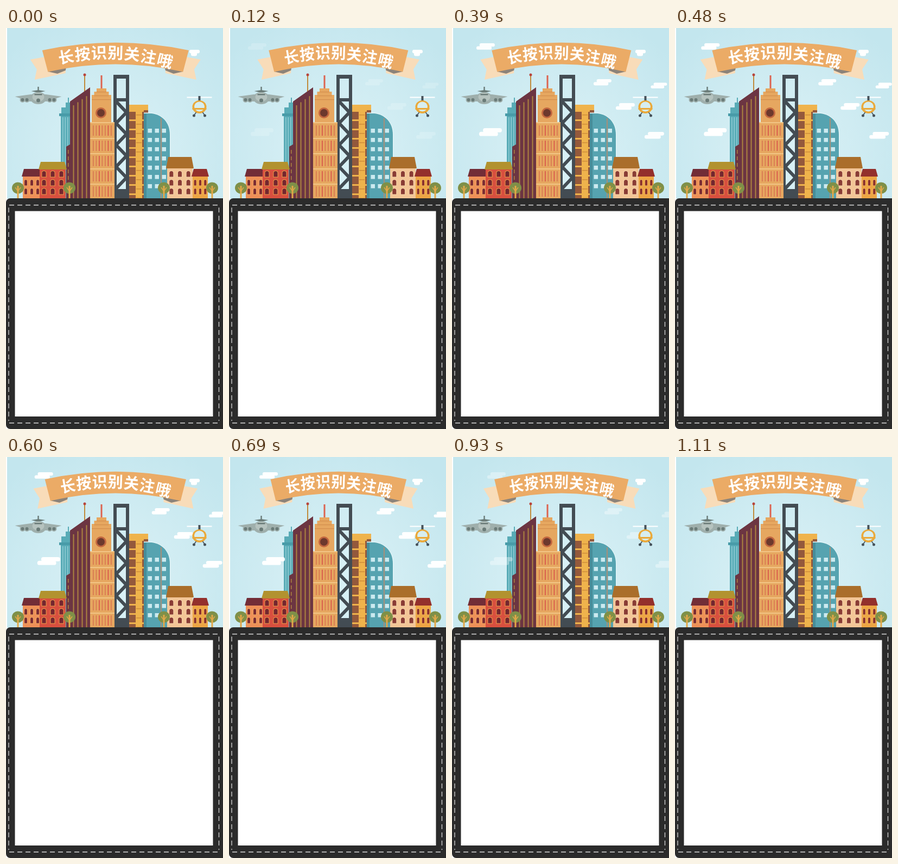
Animation of 400x737 px, one loop 1140 ms. Source, as an HTML page with a canvas:

```html
<!DOCTYPE html>
<html lang="zh">
<head>
<meta charset="utf-8">
<style>
  html, body { margin: 0; width: 100%; height: 100%; overflow: hidden; background: #fff; }
  canvas { display: block; }
</style>
</head>
<body>
<canvas id="stage" width="400" height="737"></canvas>
<script>
const LOOP = 1140, STEP = 30, PEAK = 510;
const GROUND = 313;
const main = document.getElementById('stage').getContext('2d');
let c = main;

function rect(color, x, y, w, h) {
  c.fillStyle = color;
  c.fillRect(x, y, w, h);
}

// rectangle from y down to the ground
function column(color, x, y, w) {
  rect(color, x, y, w, GROUND - y);
}

function poly(color, ...p) {
  c.fillStyle = color;
  c.beginPath();
  for (let i = 0; i < p.length; i += 2) c.lineTo(p[i], p[i + 1]);
  c.closePath();
  c.fill();
}

function line(color, width, ...p) {
  c.strokeStyle = color;
  c.lineWidth = width;
  c.beginPath();
  for (let i = 0; i < p.length; i += 2) c.lineTo(p[i], p[i + 1]);
  c.stroke();
}

function oval(color, x, y, rx, ry = rx) {
  c.fillStyle = color;
  c.beginPath();
  c.ellipse(x, y, rx, ry, 0, 0, Math.PI * 2);
  c.fill();
}

function round(color, x, y, w, h, r) {
  c.fillStyle = color;
  c.beginPath();
  c.roundRect(x, y, w, h, r);
  c.fill();
}

function mirror(paint) {
  for (const side of [-1, 1]) {
    c.save();
    c.scale(side, 1);
    paint();
    c.restore();
  }
}

function repeat(n, paint) {
  for (let i = 0; i < n; i++) paint(i);
}

function paintSky() {
  const glow = c.createRadialGradient(200, 230, 40, 200, 230, 270);
  glow.addColorStop(0, '#d8f0f5');
  glow.addColorStop(1, '#c3e6ee');
  rect(glow, 2, 0, 398, GROUND + 1);
}

function sky() {
  rect('#fff', 0, 0, 400, 737);
  paintSky();
}

function house(x, y, w, roofH, cols, roof, wall, pane, trim) {
  column(wall, x, y + roofH, w);
  poly(roof, x + 2, y, x + w - 2, y, x + w + 2, y + roofH, x - 2, y + roofH);
  const gap = w / cols, size = gap * 0.45, rows = Math.floor((GROUND - y - roofH) / 17);
  repeat(cols, i => repeat(rows, j => {
    const left = x + gap * (i + 0.5) - size / 2, top = 295 - j * 16;
    round(trim, left - 1, top - 1, size + 2, 12.5, [size, size, 0, 0]);
    round(pane, left, top, size, 10.5, [size / 2, size / 2, 0, 0]);
  }));
}

function tree(x) {
  oval('#7f9048', x, 294, 11, 10.5);
  column('#e3a748', x - 1.5, 290, 3);
  line('#e3a748', 1.5, x - 5, 293, x, 300, x + 5, 293);
}

function tealTower() {
  const wall = '#58abb6';
  rect(wall, 114, 128, 2, 12);
  rect(wall, 110, 137, 9, 12);
  rect(wall, 102, 146, 18, 12);
  rect('#489ba8', 98, 157, 22, 5);
  column(wall, 101, 162, 19);
  repeat(4, i => column('#8ecbd3', 104 + i * 4.5, 164, 1.6));
}

function plumTower() {
  rect('#c08a3a', 144, 88, 2, 30);
  oval('#b8443c', 145, 86, 2.5);
  poly('#6c3542', 118, 135, 155, 109, 155, GROUND, 111, GROUND, 111, 218, 118, 214);
  repeat(4, i => column('#ab8440', 123.5 + i * 8, 142 - i * 5.6, 2));
  repeat(7, i => rect('#ab8440', 114, 224 + i * 12, 1.5, 7));
}

function clockTower() {
  const wall = '#e6a760', pale = '#f2c585', shade = '#d38e4d';
  rect('#dc6450', 174.5, 87, 3, 26);
  repeat(3, i => rect(wall, 167 - i * 4.5, 111 + i * 6, 18 + i * 9, 8));
  rect(wall, 158, 128, 36, 48);
  column(wall, 155, 174, 45);
  repeat(3, i => rect(shade, 167 - i * 4.5, 117 + i * 7, 18 + i * 9, 1.2));
  oval('#c2673f', 175, 156, 10);
  oval('#6c382d', 175, 156, 7);
  rect(pale, 155, 173, 45, 2);
  repeat(5, j => {
    const y = 179 + j * 28;
    repeat(7, i => rect(i % 3 === 2 ? '#d9584b' : '#d97a52', 160 + i * 5.5, y, 1.8, 19));
    rect(pale, 155, y + 23, 45, 2);
  });
}

function trussTower() {
  const steel = '#434c53';
  column(steel, 198, 86, 29);
  c.save();
  c.beginPath();
  c.rect(204, 93, 17, 36);
  c.rect(204, 135, 17, 161);
  c.clip();
  paintSky();
  c.beginPath();
  c.rect(204, 135, 17, 161);
  c.clip();
  const zig = [];
  repeat(9, i => zig.push(i % 2 ? 222 : 203, 135 + i * 20));
  line(steel, 6, ...zig);
  c.restore();
}

function amberBlock() {
  const amber = '#efb34c';
  column('#94593c', 227, 141, 35);
  rect(amber, 227, 141, 35, 10);
  column(amber, 239, 150, 12);
  repeat(10, i => {
    rect(amber, 227, 151 + i * 17, 27, 3);
    rect('#cf8c3a', 240, 159 + i * 17, 10, 1.5);
  });
}

function curvedBlock() {
  const shape = (color, d) => {
    c.fillStyle = color;
    c.beginPath();
    c.moveTo(254, GROUND);
    c.lineTo(254, 157 - d);
    c.lineTo(268, 157 - d);
    c.bezierCurveTo(286, 159 - d, 302 + d, 172, 302 + d, 196);
    c.lineTo(302 + d, GROUND);
    c.fill();
  };
  shape('#e2f4f7', 1.5);
  shape('#56a3b0', 0);
  column('#468d9a', 254, 158, 5);
  column('#b08d72', 285, 166, 1.8);
  repeat(3, i => repeat(7, j => rect('#cbeaf0', 261.5 + i * 13, 185 + j * 17, 7.5, 7.5)));
}

function city() {
  tealTower();
  plumTower();
  trussTower();
  clockTower();
  amberBlock();
  curvedBlock();
  house(31, 259, 33, 14, 3, '#722d37', '#ee9058', '#7b2c33', '#f0ab62');
  house(62, 246, 48, 14, 3, '#b2922f', '#d8503f', '#74262f', '#eda04c');
  house(297, 237, 47, 21, 3, '#aa6e2b', '#f3c697', '#893c35', '#f8d8ae');
  house(344, 259, 28, 14, 3, '#93302c', '#eda544', '#8b302d', '#f3b95c');
  [22, 117, 291, 380].forEach(tree);
}

function plane() {
  const body = '#9fafac', dark = '#6a7b78';
  c.save();
  c.translate(59.5, 0);
  rect(dark, -1.2, 108, 2.4, 13);
  mirror(() => {
    poly(dark, 0, 114, 13, 116, 0, 119);
    poly(body, 0, 122, 14, 122, 43, 126, 16, 135, 0, 135);
    repeat(2, i => {
      oval(body, 21 + i * 8, 132, 5);
      oval(dark, 21 + i * 8, 132, 3);
    });
  });
  oval(body, 0, 129, 15, 11);
  oval('#b6c3bf', 0, 127, 11, 8);
  rect(dark, -7, 121, 14, 2.5);
  oval(dark, 0, 133, 3.5);
  c.restore();
}

function helicopter() {
  const amber = '#eaa93a', dark = '#46525a';
  c.save();
  c.translate(356.5, 0);
  rect('#fff', -23, 126.5, 46, 2);
  rect(dark, -2, 125, 4, 9);
  oval(amber, 0, 145, 13, 12);
  oval('#d7eef0', 0, 144.5, 9.5, 9);
  rect(amber, -13, 147, 26, 3);
  mirror(() => {
    line(dark, 1.5, 6, 155, 9.5, 160);
    oval(dark, 10, 161, 2.5);
  });
  c.restore();
}

function board() {
  round('#2b2b2b', 0, GROUND, 400, 424, [8, 0, 0, 8]);
  rect('#fff', 16.5, 336.5, 365, 377.5);
  c.setLineDash([9, 6]);
  for (const y of [325.5, 726]) line('#d9d9d9', 1.3, 6, y, 393, y);
  for (const x of [5, 392.5]) line('#d9d9d9', 1.3, x, 330, x, 722);
  c.setLineDash([]);
}

function cloud(x, y, w) {
  const bar = w * 0.83, h = w * 0.185;
  c.fillStyle = '#fff';
  c.beginPath();
  c.roundRect(x + w - bar, y, bar, h, h / 2);
  c.roundRect(x, y + h * 0.88, bar, h, h / 2);
  c.fill();
}

function clouds(t) {
  const k = Math.max(0, Math.min(1, t / 450, (1110 - t) / 450));
  c.save();
  c.globalAlpha = k * k * (3 - 2 * k);
  c.translate(t * 0.037, 0);
  cloud(30.5, 28, 34);
  cloud(246.5, 94, 33);
  cloud(352, 100.5, 30);
  cloud(287.5, 138, 35);
  cloud(35.5, 184, 42);
  cloud(340.5, 191, 36);
  c.restore();
}

// full width at both ends of the loop and at PEAK, shrinking evenly in between
function pulse(t) {
  return 1 - 0.0004 * Math.min(t, Math.abs(t - PEAK), LOOP - t);
}

function banner(scale) {
  c.save();
  c.translate(201.8, 0);
  c.scale(scale, 1);
  mirror(() => {
    poly('#f8dcb9', 130, 53, 157, 58, 145, 76, 149, 95, 92, 83, 92, 74);
    poly('#8c8379', 125, 80, 91, 73, 92, 78, 107, 84);
  });
  c.fillStyle = '#ebab66';
  c.beginPath();
  c.moveTo(-135, 41);
  c.quadraticCurveTo(0, 12.5, 135, 41);
  c.lineTo(124.5, 80.5);
  c.quadraticCurveTo(0, 52.5, -124.5, 80.5);
  c.fill();

  c.fillStyle = '#fff';
  c.font = '700 29px "Noto Sans CJK SC", "Noto Sans CJK", sans-serif';
  c.textAlign = 'center';
  [...'长按识别关注哦'].forEach((ch, i) => {
    const u = i - 3;
    c.save();
    c.translate(u * 30.4, 45.5 + 1.2 * u + 1.25 * u * u);
    c.rotate((1.2 + 2.5 * u) / 36);
    c.fillText(ch, 0, 10.8);
    c.restore();
  });
  c.restore();
}

function layer(paint) {
  const cv = document.createElement('canvas');
  cv.width = 400;
  cv.height = 737;
  c = cv.getContext('2d');
  paint();
  c = main;
  return cv;
}

const back = layer(() => {
  sky();
  round('#fff', 338, 40, 19, 6.5, 3);
  round('#fff', 341, 44, 11, 7.5, 3);
  city();
  plane();
  board();
});
const front = layer(helicopter);

function frame() {
  const t = Math.floor(performance.now() % LOOP / STEP) * STEP;
  c.drawImage(back, 0, 0);
  clouds(t);
  c.drawImage(front, 0, 0);
  banner(pulse(t));
  requestAnimationFrame(frame);
}
frame();
</script>
</body>
</html>
```
